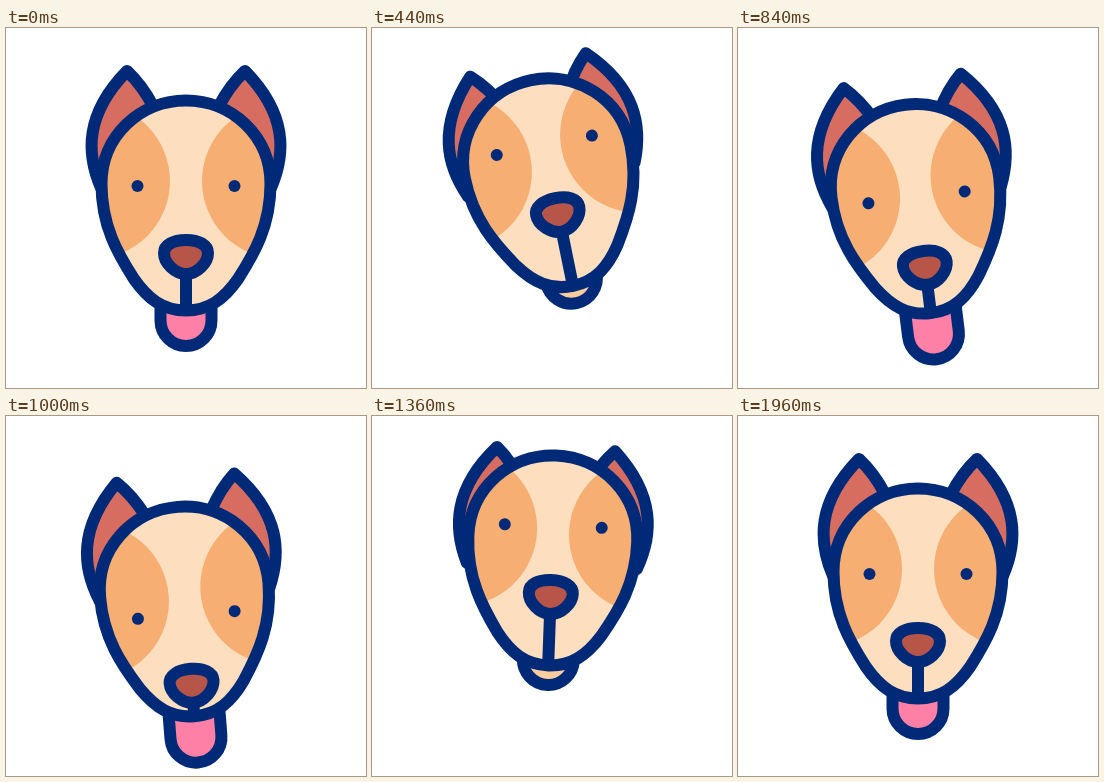
These frames come from a looping animation (360x360 px, 2000 ms). An HTML page:

```html
<!DOCTYPE html>
<html lang="en">
<head>
<meta charset="utf-8">
<title>Nodding dog</title>
<style>
  html, body { margin: 0; width: 100%; height: 100%; overflow: hidden; background: #fff; }
  svg { display: block; width: 100vw; height: 100vh; }
  .line { stroke: #002a78; stroke-width: 12; stroke-linejoin: round; stroke-linecap: round; }
</style>
</head>
<body>
<svg viewBox="0 0 360 360">
  <defs>
    <path id="skull" d="M180 72.5C226 72.5 264.5 108 264.5 156C264.5 198 248 226 232 251C218 271 203 282.5 180 282.5C157 282.5 142 271 128 251C112 226 95.5 198 95.5 156C95.5 108 134 72.5 180 72.5Z"/>
    <path id="ear" d="M95 160C80 125 79 86 121 43Q136 57 147 78L152 100Z"/>
    <clipPath id="inside"><use href="#skull"/></clipPath>
  </defs>
  <g id="dog">
    <g id="ears" class="line" fill="#d66d60">
      <use href="#ear"/>
      <use href="#ear" transform="matrix(-1 0 0 1 360 0)"/>
    </g>
    <path id="tongue" class="line"/>
    <use href="#skull" fill="#fddfbf"/>
    <g clip-path="url(#inside)" fill="#f6ae72">
      <g id="patches">
        <circle cx="86" cy="153" r="78"/>
        <circle cx="274" cy="153" r="78"/>
      </g>
    </g>
    <path id="lip" class="line"/>
    <use href="#skull" class="line" fill="none"/>
    <g id="face">
      <circle cx="131.5" cy="158" r="6" fill="#002a78"/>
      <circle cx="228.5" cy="158" r="6" fill="#002a78"/>
      <path class="line" fill="#b85549" d="M180 212C193 212 202 217 202 225C202 235 191 246 180 246C169 246 158 235 158 225C158 217 167 212 180 212Z"/>
    </g>
  </g>
</svg>
<script>
const LOOP = 2000, STEP = 40;

// Four moves: look up, drop, toss up again, settle. Each span is [start, end] in ms.
const spans = [[0, 400], [530, 1070], [1070, 1360], [1360, 1880]];
const tiltSpans = [[0, 330], spans[1], spans[2], [1600, 1960]];
const tongueSpans = [[0, 220], [300, 740], spans[2], [1360, 1660]];

const smooth = u => {
  u = Math.min(1, Math.max(0, u));
  return u * u * (3 - 2 * u);
};

// Starts at rest, reaches one pose per move and ends at rest.
function motion(t, rest, poses, moves = spans) {
  const stops = [rest, ...poses, rest];
  return moves.reduce((value, [start, end], i) =>
    value + (stops[i + 1] - stops[i]) * smooth((t - start) / (end - start)), rest);
}

const el = id => document.getElementById(id);
const set = (id, name, value) => el(id).setAttribute(name, value);
const shift = (id, y) => set(id, "transform", `translate(0 ${y})`);

function draw(t) {
  const lift = motion(t, 0, [-22.5, 20, -33]);
  const tilt = motion(t, 0, [-11.5, -4.2, 2.1], tiltSpans);
  const nod = motion(t, 0, [-19, 25, -15]);
  const out = motion(t, 35, [8, 46, 19], tongueSpans);
  const side = 257.5 + out;

  set("dog", "transform", `translate(0 ${lift}) rotate(${tilt} 180 177.5)`);
  shift("ears", motion(t, 0, [14, 0, 23]));
  shift("face", nod);
  shift("patches", nod * 0.3);
  set("lip", "d", `M180 ${240 + nod}V282`);
  set("tongue", "d", `M154.5 250V${side}A25.5 25.5 0 0 0 205.5 ${side}V250Z`);
  set("tongue", "fill", out < 23 ? "#fccb9e" : "#ff80a6");
}

function tick(now) {
  draw(Math.floor(now % LOOP / STEP) * STEP);
  requestAnimationFrame(tick);
}
draw(0);
requestAnimationFrame(tick);
</script>
</body>
</html>
```
